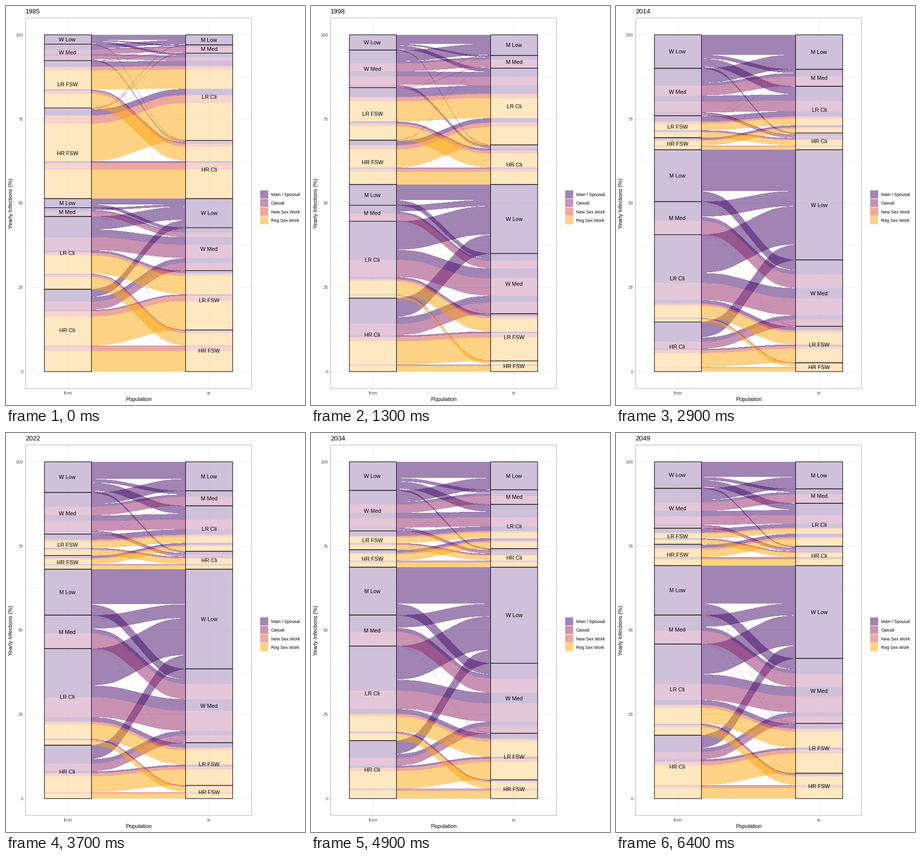
These frames come from a looping animation (600 by 800 pixels, 6.5 s). A matplotlib script:

```python
import numpy as np
import matplotlib.pyplot as plt
from matplotlib.animation import FuncAnimation
from matplotlib.patches import Rectangle

W, H = 600, 800
PT = 0.72                      # points per pixel at 100 dpi
FIRST_YEAR, FRAMES = 1985, 65

# Panel box; the axes reach 10 % past the columns and 5 % past the data
PX0, PX1, PY0, PY1 = 39.3, 492.6, 24.0, 766.8
UNIT = (PX1 - PX0) / 1.6
L0 = PX0 + UNIT * 2 / 15
L1, R0, R1 = (L0 + UNIT * k / 3 for k in (1, 3, 4))
TOP = PY0 + (PY1 - PY0) / 22
BOTTOM = PY1 - (PY1 - PY0) / 22

plt.rcParams["font.family"] = "Liberation Sans"

TYPES = ["Main / Spousal", "Casual", "New Sex Work", "Reg Sex Work"]
COLORS = np.array([[66, 10, 104], [147, 38, 103],
                   [221, 81, 58], [252, 165, 10]]) / 255
WOMEN = ["W Low", "W Med", "LR FSW", "HR FSW"]
MEN = ["M Low", "M Med", "LR Cli", "HR Cli"]
LOW, MED, LR, HR = range(4)

# How strongly each group of women (rows) mixes with each group of men
AFFINITY = np.array([[2.8, 0.6, 1, 1],
                     [1, 1, 1, 1],
                     [0.012, 0.02, 1, 2.5],
                     [0.012, 0.015, 1, 2.75]])

# Heights of the borders between nodes at a few years
KEY_YEARS = np.array([1985, 1993, 2004, 2014, 2022, 2049])
MIDDLE = [386.3, 369, 341.3, 288.3, 273.2, 265.8]
LEFT = [[76.5, 72.3, 114.3, 125, 119.3, 111],
        [109.5, 116.3, 220.5, 220, 202.7, 191],
        [204.5, 244.5, 286.5, 264, 245.5, 223.2],
        MIDDLE,
        [404.5, 391.3, 410.3, 392.3, 365.2, 365],
        [422, 409.5, 460.5, 458.5, 432.3, 423.2],
        [568, 563, 621.5, 633.5, 626, 606]]
RIGHT = [[78, 78.5, 126.5, 127, 116, 112],
         [94.5, 94.5, 164.3, 161, 146, 141],
         [269.5, 267.3, 293, 254.5, 237.3, 227.2],
         MIDDLE,
         [444.5, 476, 511, 509.2, 473, 452],
         [530.5, 582.3, 642.3, 642.3, 621, 582.3],
         [649.5, 702.8, 716, 715.3, 706.5, 682.2]]


def smoothstep(t):
    t = min(max(t, 0), 1)
    return t * t * (3 - 2 * t)


def monotone(points):
    """Monotone cubic curve through the key years."""
    v = np.array(points, dtype=float)
    span = np.diff(KEY_YEARS)
    rate = np.diff(v) / span
    slope = np.zeros_like(v)
    slope[0], slope[-1] = rate[0], rate[-1]
    for k in range(1, len(v) - 1):
        a, b = rate[k - 1], rate[k]
        if a * b > 0:
            slope[k] = 2 * a * b / (a + b)

    def curve(year):
        k = min(np.searchsorted(KEY_YEARS, year, side="right") - 1, len(span) - 1)
        t = (year - KEY_YEARS[k]) / span[k]
        s = smoothstep(t)
        bend = (1 - t) * slope[k] - t * slope[k + 1]
        return v[k] + (v[k + 1] - v[k]) * s + span[k] * t * (1 - t) * bend

    return curve


LEFT_CURVES = [monotone(p) for p in LEFT]
RIGHT_CURVES = [monotone(p) for p in RIGHT]


def borders(curves, year):
    return np.array([TOP] + [c(year) for c in curves] + [BOTTOM])


def mix(women, men):
    """Scale the affinities until rows and columns add up."""
    m = AFFINITY.copy()
    for _ in range(150):
        m *= (women / m.sum(axis=1))[:, None]
        m *= men / m.sum(axis=0)
    return m


def split(w, m, women_first, year):
    """Shares of the four partnership types within one pair of groups."""
    if LOW in (w, m):
        return 1, 0, 0, 0
    if w == MED:
        casual = 0.77 if m == MED else 0.63
        return 1 - casual, casual, 0, 0
    if m == MED:
        return 0, 1, 0, 0
    main = 0.18 if women_first else 0.10
    main *= 1 + 1.1 * smoothstep((year - FIRST_YEAR) / 32)
    main *= (0.65 if w == HR else 1) * (0.4 if m == HR else 1)
    casual = 0.08 * main if women_first else 0
    new = 0.12 + 0.03 * ((w == HR) + (m == HR))
    return main, casual, new, 1 - main - casual - new


def flow_heights(left, right, year):
    """Heights indexed by source node, target node and type."""
    out, into = np.diff(left), np.diff(right)
    upper, lower = mix(out[:4], into[:4]), mix(into[4:], out[4:])
    h = np.zeros((8, 8, 4))
    for w in range(4):
        for m in range(4):
            h[w, m] = upper[w, m] * np.array(split(w, m, True, year))
            h[4 + m, 4 + w] = lower[w, m] * np.array(split(w, m, False, year))
    return h


def stack(h):
    """Top edge of every flow when piled up in index order."""
    return TOP + (np.cumsum(h) - h.ravel()).reshape(h.shape)


def blend(u, p):
    u = np.clip(u, 0, 1)
    return u ** 3 * (10 - p + (2 * p - 15) * u + (6 - p) * u * u)


def ease_curve():
    """X-spline with knots at a quarter and three quarters of the gap."""
    t = np.linspace(0, 3, 301)
    end = lambda s: blend((2 - s) / 2, 8)
    mid = lambda s: np.where(s <= 1, blend(s, 2), blend((3 - s) / 2, 8))
    w = np.array([end(t), mid(t), mid(3 - t), end(3 - t)])
    w /= w.sum(axis=0)
    return np.array([0, 0.25, 0.75, 1]) @ w, w[2] + w[3]


curve_x, curve_y = ease_curve()
C0, C1 = round(L0), round(R1)
EASE = np.interp((np.arange(C0, C1) + 0.5 - L1) / (R0 - L1), curve_x, curve_y)
ROWS = np.arange(H)[:, None] + 0.5


def level(percent):
    return BOTTOM - (BOTTOM - TOP) * percent / 100


# White panel with its grid
base = np.ones((H, W, 3), dtype=np.float32)
for k in range(9):
    base[int(level(12.5 * k)), 40:492] = 0.97 if k % 2 else 0.935
for x in (L0 + L1, R0 + R1):
    base[25:766, int(x / 2)] = 0.935


def paint(h):
    """Hard-edged, half transparent bands, one type after another."""
    img = base.copy()
    left = stack(h)
    right = stack(h.transpose(1, 0, 2)).transpose(1, 0, 2)
    for kind, color in enumerate(COLORS):
        for s, d in np.argwhere(h[:, :, kind] > 0):
            size, y0, y1 = (a[s, d, kind] for a in (h, left, right))
            top = y0 + (y1 - y0) * EASE
            a, b = int(top.min()), int(top.max() + size) + 1
            area = img[a:b, C0:C1]
            mask = (ROWS[a:b] >= top) & (ROWS[a:b] < top + size)
            area[mask] = (area[mask] + color) / 2
    return img


fig = plt.figure(figsize=(6, 8), dpi=100, facecolor="white")
ax = fig.add_axes([0, 0, 1, 1])
ax.axis("off")
picture = ax.imshow(base, extent=(0, W, H, 0), interpolation="nearest",
                    aspect="auto", vmin=0, vmax=1)
ax.set_xlim(0, W)
ax.set_ylim(H, 0)


def text(x, y, s, size, **kw):
    return ax.text(x, y, s, fontsize=size * PT, **kw)


def rect(x, y, w, h, **kw):
    return ax.add_patch(Rectangle((x, y), w, h, snap=False, **kw))


def line(xs, ys):
    ax.plot(xs, ys, color="#b3b3b3", lw=0.55 * PT, snap=False)


def make_nodes(names, x0, x1, label_x):
    return [(rect(x0, TOP, x1 - x0, 1, facecolor=(1, 1, 1, 0.5),
                  edgecolor="black", linewidth=1.07 * PT, zorder=3),
             text(label_x, TOP, name, 11, ha="center", zorder=4))
            for name in names]


def place(nodes, edges):
    for (box, label), y0, y1 in zip(nodes, edges[:-1], edges[1:]):
        box.set_y(y0)
        box.set_height(y1 - y0)
        label.set_y((y0 + y1) / 2 + 3.9)


rect(PX0, PY0, PX1 - PX0, PY1 - PY0, fill=False, edgecolor="#b3b3b3",
     linewidth=1.07 * PT, zorder=5)
for v in range(0, 101, 25):
    y = level(v)
    line([PX0 - 2.8, PX0], [y, y])
    text(34.3, y + 3.1, str(v), 8.8, ha="right", color="#4d4d4d")
for x, name in (((L0 + L1) / 2, "from"), ((R0 + R1) / 2, "to")):
    line([x, x], [PY1, PY1 + 2.8])
    text(x, 779, name, 8.8, ha="center", color="#4d4d4d")
text((PX0 + PX1) / 2, 792, "Population", 11, ha="center")
text(13.3, 395.5, "Yearly Infections (%)", 11, ha="center", va="baseline",
     rotation=90, rotation_mode="anchor")
for k, name in enumerate(TYPES):
    y = 369.2 + 17.28 * k
    rect(510, y + 0.5, 16.2, 16.2, facecolor=(1 + COLORS[k]) / 2, linewidth=0)
    text(532, y + 11.8, name, 8.8)

title = text(PX0, 15, "", 13.2)
left_nodes = make_nodes(WOMEN + MEN, L0, L1, 123.2)
right_nodes = make_nodes(MEN + WOMEN, R0, R1, 407.6)


def update(n):
    year = FIRST_YEAR + n
    left, right = borders(LEFT_CURVES, year), borders(RIGHT_CURVES, year)
    picture.set_data(paint(flow_heights(left, right, year)))
    place(left_nodes, left)
    place(right_nodes, right)
    title.set_text(str(year))
    return []


anim = FuncAnimation(fig, update, frames=FRAMES, interval=100,
                     repeat=True, repeat_delay=0, blit=False)
plt.show()
```
